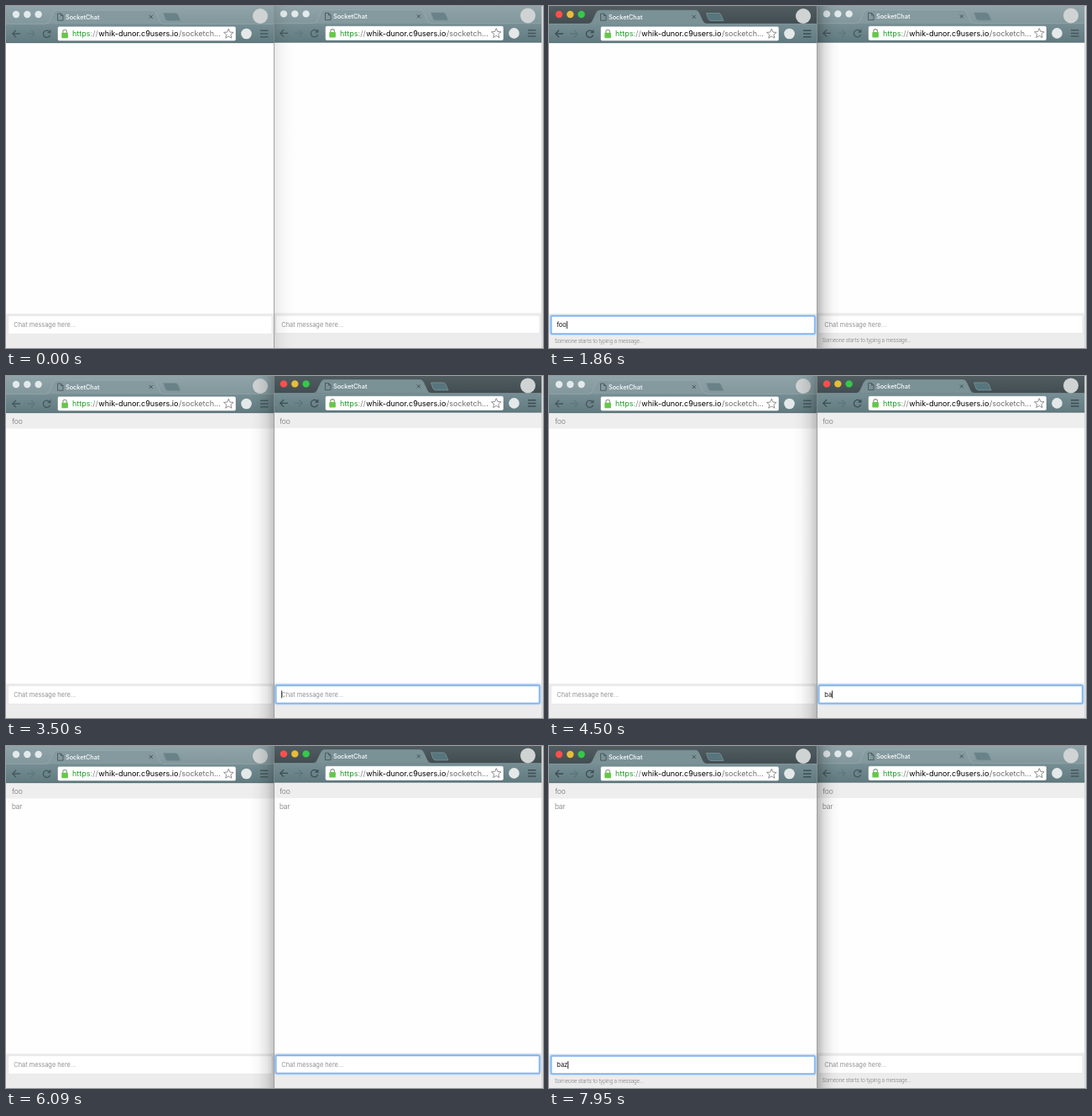
Write an HTML page that moves like this. It is 640 px wide and 407 px high and loops after 8 s.

```html
<!DOCTYPE html>
<html lang="en">
<head>
<meta charset="utf-8">
<title>SocketChat</title>
<style>
html, body { margin: 0; width: 100%; height: 100%; overflow: hidden; background: #fff; }
svg { display: block; width: 640px; height: 407px; }
.ui { font-family: Inter, "Open Sans", sans-serif; }
.thin { font-family: Roboto, "Open Sans", sans-serif; font-weight: 300; }
</style>
</head>
<body>
<svg id="stage" viewBox="0 0 640 407" xmlns="http://www.w3.org/2000/svg"></svg>
<script>
const LOOP = 8000;
const DX = 319;

// Which window is in front: 0 left, 1 right
const switches = [[900, 0], [3380, 1], [6400, 0]];
const focuses = [[0, 1250, 3380], [1, 3420, 6400], [0, 6800, LOOP]];
const statuses = [[1750, 2950], [4700, 5600], [7700, LOOP]];
const FOO_AT = 2200, BAR_AT = 5200;
const typing = [
  [0, 1500, 'f'], [0, 1660, 'fo'], [0, 1820, 'foo'], [0, FOO_AT, ''],
  [1, 4220, 'b'], [1, 4400, 'ba'], [1, 4620, 'bar'], [1, BAR_AT, ''],
  [0, 7480, 'b'], [0, 7640, 'ba'], [0, 7820, 'baz']
];
const EDGE = 'Q50.500 21 52 17.500L56.500 8Q57.800 5.200 60.500 5.200H174.500Q177.300 5.200 178.500 8L183 17.500Q184.500 21 188 21.300'
  .replace(/00\b/g, '');

const stage = document.getElementById('stage');

const gradient = (id, from, to) =>
  `<linearGradient id="${id}" x1="0" y1="0" x2="0" y2="1">
    <stop offset="0" stop-color="${from}"/><stop offset="1" stop-color="${to}"/>
  </linearGradient>`;

const fade = (id, flip) =>
  `<linearGradient id="${id}" x1="${flip}" x2="${1 - flip}">
    <stop offset="0" stop-color="#000" stop-opacity=".28"/>
    <stop offset=".3" stop-color="#000" stop-opacity=".12"/>
    <stop offset=".65" stop-color="#000" stop-opacity=".03"/>
    <stop offset="1" stop-color="#000" stop-opacity="0"/>
  </linearGradient>`;

const chrome = () => `
  <rect class="bar" width="319.5" height="22"/>
  <g class="lights">${[12, 25.3, 38.6].map(x => `<circle cx="${x}" cy="10" r="4.2"/>`).join('')}</g>
  <path class="newtab" d="M187.5 8.5H202Q204 8.5 205 10.5L208 17.5H193Q191 17.5 190 15.5Z" stroke-width=".7"/>
  <rect y="21" width="319.5" height="23" fill="url(#toolbar)"/>
  <path d="M0 43.7H319.5" stroke="#566b70" stroke-width=".7"/>
  <path class="tab" d="M47 21.3${EDGE}Z"/>
  <path class="tabline" d="M0 21.3H47${EDGE}H319" fill="none" stroke-width=".6"/>
  <path d="M61.5 9H65.5L68 11.5V17.2H61.5ZM65.5 9V11.5H68" fill="none" stroke="#3f5054" stroke-width=".8"/>
  <text class="ui" x="71" y="15.8" font-size="7.3" font-weight="500" fill="#fff">SocketChat</text>
  <path d="M170.8 10.9L174.8 14.9M174.8 10.9L170.8 14.9" stroke="#3d4c50" stroke-width=".9"/>
  <circle cx="303" cy="12" r="9" fill="#d0d3d3"/>
  <g class="icons" fill="none" stroke="#3c4e52" stroke-width="1.3">
    <path d="M17 33H8M12 28.8L7.8 33L12 37.2"/>
    <path d="M25 33H34M30 28.8L34.2 33L30 37.2" opacity=".28"/>
    <path d="M52 30.8A4.2 4.2 0 1 0 52.6 34.5M52.8 28.5V31.6H49.5"/>
    <path d="M303 29.3H312.5M303 33H312.5M303 36.7H312.5" stroke-width="1.5"/>
  </g>
  <rect x="61.5" y="24.3" width="212.500" height="17.3" rx="2" fill="#fff" stroke="#5d7378" stroke-width=".4"/>
  <path d="M67.8 32V30.5A2.3 2.3 0 0 1 72.4 30.5V32" fill="none" stroke="#8d9a8d" stroke-width="1.1"/>
  <rect x="66.3" y="31.7" width="7.6" height="6.5" rx=".8" fill="#67c74b"/>
  <text class="ui" y="36.3" font-size="9.04">
    <tspan x="79" fill="#1d9a25">https</tspan><tspan fill="#888">://</tspan><tspan x="110.3" fill="#000">whik-dunor.c9users.io</tspan><tspan x="206" fill="#6d6d6d">/socketch...</tspan>
  </text>
  <path d="M265.3 27.2L266.9 31.1L271.1 31.4L267.9 34.1L268.9 38.2L265.3 36L261.7 38.2L262.7 34.1L259.5 31.4L263.7 31.1Z" fill="#fff" stroke="#777" stroke-width=".8"/>
  <circle cx="286.5" cy="33" r="6.3" fill="#e4e8e8"/>`;

const page = () => `
  <rect y="44" width="319.5" height="364" fill="#fefefe"/>
  <g class="foo thin" font-size="8.8" fill="#666">
    <rect y="44" width="319.5" height="18.5" fill="#efeeef"/>
    <text x="6.9" y="57.4">foo</text>
  </g>
  <text class="bar-row thin" x="6.9" y="75.4" font-size="8.8" fill="#666">bar</text>
  <rect y="366" width="319.5" height="42" fill="#ececed"/>
  <rect x="2.5" y="368.8" width="314.5" height="21.4" fill="#fff" stroke="#e2e2e3" stroke-width=".6"/>
  <g class="ring" fill="none">
    <rect x="2.2" y="368.5" width="315" height="22" rx="2" stroke="#c3dcf7" stroke-width="3.2"/>
    <rect x="2.4" y="368.7" width="314.6" height="21.6" rx="1.5" stroke="#82b4ec" stroke-width="1.6"/>
  </g>
  <text class="hint ui" x="9.3" y="382.3" font-size="7.38" fill="#919191">Chat message here...</text>
  <text class="typed ui" x="9.3" y="382.3" font-size="7.4" fill="#111"></text>
  <rect class="caret" y="375" width=".8" height="9" fill="#000"/>
  <text class="status thin" x="6.8" y="401" font-size="6.5" fill="#777" letter-spacing="-.1">Someone starts to typing a message...</text>`;

stage.innerHTML = `<defs>
  ${gradient('active', '#525d61', '#414c50')}
  ${gradient('idle', '#90a4a9', '#81979c')}
  ${gradient('toolbar', '#778f94', '#607a7f')}
  ${fade('toRight', 0)}${fade('toLeft', 1)}
  </defs>
  <rect width="640" height="407" fill="#e3e4e5"/>
  <g class="win">${page()}${chrome()}</g>
  <g class="win" transform="translate(${DX} -.6)">${page()}${chrome()}</g>
  <rect id="shadeR" x="319.5" width="28" height="407" fill="url(#toRight)"/>
  <rect id="shadeL" x="290" width="29.5" height="407" fill="url(#toLeft)"/>
  <path d="M319.5 0V407" stroke="#8b9092" stroke-width=".8"/>
  <path d="M638.8 0V407" stroke="#c3c6c7" stroke-width=".8"/>`;

const wins = [...stage.querySelectorAll('.win')].map(root => {
  const get = name => root.querySelector('.' + name);
  return {
    bar: get('bar'), lights: [...get('lights').children], newtab: get('newtab'),
    tab: get('tab'), tabline: get('tabline'), icons: get('icons'), foo: get('foo'),
    barRow: get('bar-row'), ring: get('ring'), hint: get('hint'), typed: get('typed'),
    caret: get('caret'), status: get('status')
  };
});
const shadeR = document.getElementById('shadeR');
const shadeL = document.getElementById('shadeL');

const show = (el, on) => el.setAttribute('visibility', on ? 'visible' : 'hidden');
const paint = (el, fill, stroke) => {
  if (fill) el.setAttribute('fill', fill);
  if (stroke) el.setAttribute('stroke', stroke);
};

function drawWindow(w, i, t, front) {
  const on = front === i;
  paint(w.bar, on ? 'url(#active)' : 'url(#idle)');
  const colors = on ? ['#fb504b', '#e6bd3a', '#36c84b'] : Array(3).fill('#e3eaeb');
  w.lights.forEach((dot, k) => paint(dot, colors[k]));
  paint(w.tab, on ? '#7a9196' : '#849a9f');
  paint(w.tabline, '', on ? '#879ca1' : '#a0b1b5');
  paint(w.newtab, on ? '#56757c' : '#698287', on ? '#829ba1' : '#789096');
  w.icons.setAttribute('opacity', on ? 1 : 0.8);

  show(w.foo, t >= FOO_AT);
  show(w.barRow, t >= BAR_AT);
  show(w.status, statuses.some(([a, b]) => t >= a && t < b));

  const focus = focuses.find(([k, a, b]) => k === i && t >= a && t < b);
  const last = typing.filter(([k, at]) => k === i && at <= t).pop();
  const text = last ? last[2] : '';
  if (w.typed.textContent !== text) w.typed.textContent = text;
  show(w.hint, !text);
  show(w.ring, focus);

  // The caret blink restarts with each key
  const since = focus ? t - Math.max(focus[1], last ? last[1] : 0) : 0;
  show(w.caret, focus && since % 1000 < 500);
  w.caret.setAttribute('x', 9.3 + (text ? w.typed.getComputedTextLength() + 0.2 : 0));
}

function draw(t) {
  const current = switches.filter(([at]) => at <= t).pop();
  const front = current ? current[1] : -1;
  wins.forEach((w, i) => drawWindow(w, i, t, front));
  shadeR.setAttribute('opacity', front === 0 ? 1 : front < 0 ? 0.3 : 0);
  shadeL.setAttribute('opacity', front === 1 ? 0.8 : 0);
}

const start = performance.now();
function tick() {
  draw((performance.now() - start) % LOOP);
  requestAnimationFrame(tick);
}
draw(0);
requestAnimationFrame(tick);
</script>
</body>
</html>
```
